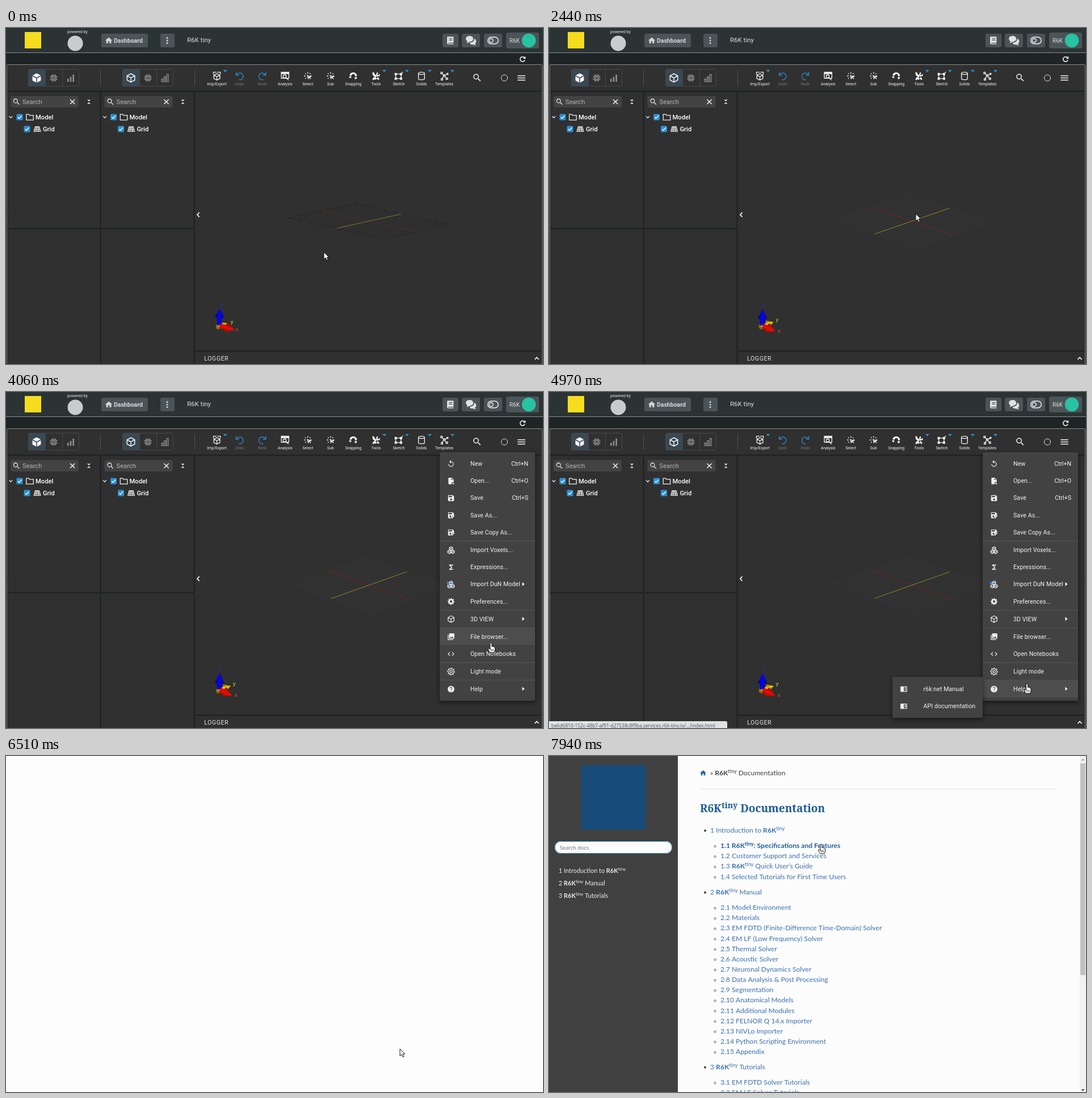
These frames come from a looping animation (946x592 px, 8000 ms). An HTML page with a canvas:

```html
<!DOCTYPE html>
<html lang="en">
<head>
<meta charset="utf-8">
<title>Modelling workspace</title>
<style>
html, body { margin: 0; width: 100%; height: 100%; overflow: hidden; background: #303030; }
canvas { display: block; }
</style>
</head>
<body>
<canvas id="stage" width="946" height="592"></canvas>
<script>
const g = document.getElementById('stage').getContext('2d');
const LOOP = 8000;
const BLUE = '#2b8fd6', WHITE = '#f4f4f4', GREY = '#8c8c8c';

// Icons live in a 24 x 24 box.
const solid = {
  search: 'M15.5 14h-.8l-.3-.3A6.5 6.5 0 1 0 13.7 14.4l.3.3v.8l5 5L20.5 19zM9.5 14a4.5 4.5 0 1 1 0-9 4.5 4.5 0 0 1 0 9z',
  menu: 'M3 18h18v-2H3zM3 13h18v-2H3zM3 6v2h18V6z',
  save: 'M17 3H5a2 2 0 0 0-2 2v14a2 2 0 0 0 2 2h14a2 2 0 0 0 2-2V7zM12 19a3 3 0 1 1 0-6 3 3 0 0 1 0 6zM15 9H5V5h10z',
  edit: 'M17 3H5a2 2 0 0 0-2 2v14a2 2 0 0 0 2 2h6l8-9 2 1V7zM12 18a3 3 0 1 1 0-5zM15 9H5V5h10zM13 22l1-3 7-7 2 2-7 7z',
  back: 'M12 5V1L7 6l5 5V7a6 6 0 1 1-6 6H4a8 8 0 1 0 8-8z',
  file: 'M14 2H6a2 2 0 0 0-2 2v16a2 2 0 0 0 2 2h8v-6h6V8zM13 9V4l5 5zM16 18h3l-1-1 4 3-4 3v-2h-2z',
  code: 'M9.4 16.6L4.8 12l4.6-4.6L8 6l-6 6 6 6zM14.6 16.6l4.6-4.6-4.6-4.6L16 6l6 6-6 6z',
  help: 'M12 2a10 10 0 1 0 .01 0zM13 19h-2v-2h2zM15 11.3c-1.5 1.3-2 2-2 3.7h-2c0-3 3-3.6 3-6a2 2 0 0 0-4 0H8a4 4 0 0 1 8 0c0 1-.4 1.7-1 2.3z',
  photos: 'M22 16V4a2 2 0 0 0-2-2H8a2 2 0 0 0-2 2v12a2 2 0 0 0 2 2h12a2 2 0 0 0 2-2zM11 12l2 2.7 3-3.7 4 5H8zM2 6v14a2 2 0 0 0 2 2h14v-2H4V6z',
  sigma: 'M18 4H6v2l6.5 6L6 18v2h12v-3h-7l5-5-5-5h7z',
  home: 'M10 20v-6h4v6h5v-8h3L12 3 2 12h3v8z',
  box: 'M12 1l9.5 5L12 11 2.5 6zM2 8l9 5v10l-9-5zM22 8l-9 5v10l9-5z',
  bars: 'M3 14h4v8H3zM10 9h4v13h-4zM17 3h4v19h-4z',
  book: 'M5 2h15v16H6v2h14v2H6a3 3 0 0 1-3-3V4a2 2 0 0 1 2-2zM8 6v2h9V6zM8 10v2h9v-2z',
  chat: 'M9 2c11 0 11 13 0 13l-6 3 1-4C-2 9 1 2 9 2zM19 8c6 2 6 9 2 11l2 4-6-2c-4 1-7-1-8-4 7 0 11-4 10-9z',
  page: 'M2 4h20v16H2zM12 6v12h8V6zM14 8h5v1.5h-5zM14 11h5v1.5h-5zM14 14h5v1.5h-5z',
  magnet: 'M2 10C4 0 20 0 22 11l-5 3C17 4 8 5 7 12zM15 17l5-3 2 4-5 3zM2 12l5 2-1 4-5-2z',
  wrench: 'M2 3l4-1 3 6 4 3 8 9-3 3-9-9-5-3zM15 2l3 3-3 3 3 2 4-4v6l-5 1-5 9-4-1 6-9-2-4zM5 16l4-2 2 3-5 6-4-1z'
};
const outline = {
  close: 'M5 5l14 14M19 5L5 19',
  cube: 'M12 2l9 5v10l-9 5-9-5V7zM3 7l9 5 9-5M12 12v10',
  chip: 'M6 6h12v12H6zM9 9h6v6H9zM9 2v4M15 2v4M9 18v4M15 18v4M2 9h4M2 15h4M18 9h4M18 15h4',
  obars: 'M3 15h4v7H3zM10 9h4v13h-4zM17 3h4v19h-4z',
  folder: 'M2 4h7l2 3h11v13H2z',
  grid: 'M6 5h12l4 14H2zM5 9h14M4 14h16M10 5L8 19M14 5l2 14',
  collapse: 'M7 3l5 5 5-5M7 21l5-5 5 5',
  down: 'M5 8l7 7 7-7', left: 'M15 4l-7 8 7 8', up: 'M5 15l7-7 7 7',
  undo: 'M3 2v8h8M4 10a9 9 0 1 1 6 12',
  import: 'M4 10l8-4 8 4v9l-8 4-8-4zM4 10l8 4 8-4M12 14v9M3 8V2h8M21 8V2h-8',
  analysis: 'M2 2h20v16H2zM2 4h20M2 6h20M15 13a4 4 0 1 1-8 0 4 4 0 0 1 8 0zM14 16l7 7',
  select: 'M12 2v4M5 5l2 2M19 5l-2 2M2 12h4M18 12h4M5 19l2-2M11 11l2 8 2-4 4-1zM15 15l5 5',
  sketch: 'M4 7h14v12H4zM2 5h4v4H2zM16 5h4v4h-4zM2 17h4v4H2zM16 17h4v4h-4zM20 4l3-3',
  solids: 'M4 5c0-4 16-4 16 0s-16 4-16 0v14c0 4 16 4 16 0V5',
  nodes: 'M3 2h4v4H3zM10 9h4v4h-4zM19 5h3v3h-3zM4 19h4v4H4zM17 17h4v4h-4zM6 6l5 4M14 11l5-4M11 13l-5 6M13 13l5 5',
  voxels: 'M12 2l5 3v5l-5 3-5-3V5zM7 12l5 3v5l-5 3-5-3v-5zM17 12l5 3v5l-5 3-5-3v-5zM7 5l5 3 5-3M2 15l5 3 10 0 5-3',
  reload: 'M20 9a8.5 8.5 0 1 0 0 6M21 3v6h-6',
  toggle: 'M8 5h8a7 7 0 0 1 0 14H8A7 7 0 0 1 8 5zM12 12a4 4 0 1 1-8 0 4 4 0 0 1 8 0z'
};
let teeth = '';
for (let i = 0; i < 32; i++) {
  const r = i % 4 < 2 ? 10.5 : 7.8, a = i * Math.PI / 16;
  teeth += (i ? 'L' : 'M') + (12 + r * Math.cos(a)) + ' ' + (12 + r * Math.sin(a));
}
solid.gear = outline.gear2 = teeth + 'zM15.5 12a3.5 3.5 0 1 0-7 0 3.5 3.5 0 0 0 7 0z';
const paths = {};
for (const [k, d] of Object.entries({ ...solid, ...outline })) paths[k] = new Path2D(d);

function icon(name, x, y, size, color = WHITE, { flip = 1, weight = 2 } = {}) {
  g.save();
  g.translate(x, y);
  g.scale(size / 24 * flip, size / 24);
  g.translate(-12, -12);
  g.fillStyle = g.strokeStyle = color;
  g.lineWidth = weight;
  if (solid[name]) g.fill(paths[name], 'evenodd'); else g.stroke(paths[name]);
  g.restore();
}
function rect(x, y, w, h, color, r = 0) {
  g.fillStyle = color;
  g.beginPath();
  g.roundRect(x, y, w, h, r);
  g.fill();
}
function frame(x, y, w, h, color, r = 0) {
  g.strokeStyle = color;
  g.lineWidth = 1;
  g.beginPath();
  g.roundRect(x + .5, y + .5, w - 1, h - 1, r);
  g.stroke();
}
function disc(x, y, r, color, ring = 0) {
  g.beginPath();
  g.arc(x, y, r, 0, 7);
  g.fillStyle = g.strokeStyle = color;
  g.lineWidth = ring;
  if (ring) g.stroke(); else g.fill();
}
function line(x1, y1, x2, y2, color, w = 1, dash = []) {
  g.strokeStyle = color;
  g.lineWidth = w;
  g.setLineDash(dash);
  g.beginPath();
  g.moveTo(x1, y1);
  g.lineTo(x2, y2);
  g.stroke();
  g.setLineDash([]);
}
function poly(color, ...p) {
  g.fillStyle = color;
  g.beginPath();
  for (let i = 0; i < p.length; i += 2) g.lineTo(p[i], p[i + 1]);
  g.closePath();
  g.fill();
}
function text(s, x, y, size, color = WHITE, { face = 'Roboto', weight = 400, align = 'left', gap = 0 } = {}) {
  g.font = `${weight} ${size}px "${face}", sans-serif`;
  g.textAlign = align;
  g.letterSpacing = gap + 'px';
  g.fillStyle = color;
  g.fillText(s, x, y);
  return g.measureText(s).width;
}
// *bold* and ^raised^ runs
function rich(s, x, y, size, color, weight = 400, face = 'Lato') {
  for (const part of s.split(/(\*[^*]+\*|\^[^^]+\^)/)) {
    const mark = part[0], up = mark === '^', bold = mark === '*';
    x += text(up || bold ? part.slice(1, -1) : part, x, up ? y - size * .36 : y,
      up ? size * .75 : size, color, { face, weight: bold ? 700 : weight });
  }
}

const clamp = v => Math.max(0, Math.min(1, v));
const ramp = (t, a, b) => clamp((t - a) / (b - a));
const mix = (a, b, k) => a + (b - a) * k;

// time, x, y of the pointer's hot spot
const trail = [
  [0, 560, 395], [55, 560, 395], [130, 574, 385], [800, 574, 385], [1350, 633, 334], [1660, 633, 334],
  [2500, 647, 327], [3200, 932, 104], [3340, 905, 84], [3400, 903, 90], [3460, 902, 108],
  [4180, 845, 508], [4300, 842, 514], [5000, 842, 514], [5570, 700, 518], [5690, 700, 518],
  [5810, 695, 515], [6300, 695, 515], [6370, 694, 516], [6960, 694, 516], [7220, 655, 385],
  [7480, 590, 270], [7820, 481, 153], [7940, 479.5, 155], [LOOP, 479.5, 155]
];
function pointer(t) {
  const i = trail.findIndex(p => p[0] > t), a = trail[i - 1], b = trail[i];
  const k = ramp(t, a[0], b[0]);
  return [mix(a[1], b[1], k), mix(a[2], b[2], k)];
}
const arrow = new Path2D('M0 0V12.5L3 9.8 5 14.3 7.2 13.3 5.2 9H9z');
const hand = new Path2D('M-1.5 1.2Q0-1 1.5 1.2V6.5Q3 5.5 3.8 7 5.2 6.3 5.8 7.7 7 7 7 9V13L5.5 17H-2L-5 11.5Q-5 8.5-3 10.5L-1.5 12z');
function drawPointer(x, y, isHand) {
  const shape = isHand ? hand : arrow;
  g.save();
  g.translate(x, y);
  g.lineJoin = 'round';
  g.fillStyle = '#fff';
  g.strokeStyle = '#111';
  g.lineWidth = 1;
  g.fill(shape);
  g.stroke(shape);
  if (isHand) for (const dx of [0, 2, 4]) line(dx, 11, dx, 14.5, '#222', .8);
  g.restore();
}

function header() {
  rect(0, 0, 946, 43, '#2c3335');
  rect(0, 43, 946, 1, '#8b9092');
  rect(0, 44, 946, 21, '#1f2527');
  rect(33, 7, 29, 29, '#f6dc1c');
  text('powered by', 108, 9, 7, '#e8e8e8');
  disc(122, 27, 13.5, '#c9cccd');
  for (const [x, w] of [[168, 82], [272, 25], [769, 28], [803, 32], [842, 32]]) rect(x, 10, w, 24, '#4b5457', 3);
  icon('home', 181, 22, 15, '#d4d6d7');
  text('Dashboard', 190, 25.5, 10.5, '#d4d6d7', { weight: 700 });
  for (const y of [17.5, 22, 26.5]) disc(284, y, 1.5, '#d4d6d7');
  text('R6K tiny', 319, 25, 11.5, '#dcdedf');
  icon('book', 783, 22, 16, '#dfe1e2');
  icon('chat', 819, 22, 19, '#dfe1e2');
  icon('toggle', 858, 22, 20, '#dfe1e2');
  rect(881, 8, 58, 28, '#4b5457', 4);
  text('R6K', 887, 25.5, 10, '#dcdedf');
  disc(921, 22, 12.3, '#27c3a2');
  icon('reload', 910, 55, 12, WHITE, { weight: 3.2 });
}

const tools = ['Imp/Export import', 'Undo undo', 'Redo undo', 'Analysis analysis', 'Select select', 'Sub select',
  'Snapping magnet', 'Tools wrench', 'Sketch sketch', 'Solids solids', 'Templates nodes'];
function toolbar() {
  rect(0, 65, 946, 527, '#303030');
  rect(0, 65, 2, 527, '#202526');
  line(2, 64.5, 944, 64.5, '#8a8a8a');
  line(1.5, 65, 1.5, 592, '#777');
  line(944.5, 65, 944.5, 592, '#777');
  for (const x of [39, 205]) {
    const second = x > 100;
    rect(x, 73, 30, 30, '#394853', 3);
    frame(x, 72, 90, 31, '#484848', 3);
    line(x + 30.5, 73, x + 30.5, 103, '#484848');
    line(x + 60.5, 73, x + 60.5, 103, '#484848');
    icon(second ? 'cube' : 'box', x + 15, 88, 18);
    icon('chip', x + 45, 88, 16, GREY);
    icon(second ? 'obars' : 'bars', x + 75, 88, 16, GREY);
    line(x + 127.5, 74, x + 127.5, 102, '#525252');
  }
  tools.forEach((tool, i) => {
    const [label, name] = tool.split(' '), x = 371.5 + i * 40.05, dim = name === 'undo';
    icon(name, x, 84.5, 16, dim ? BLUE : WHITE, { flip: label === 'Redo' ? -1 : 1 });
    text(label, x, 101, 6.9, dim ? '#777' : WHITE, { align: 'center' });
    if (i === 0 || i > 6) poly(BLUE, x + 11, 74, x + 18, 74, x + 14.5, 78);
  });
  icon('search', 830, 87.5, 18);
  disc(878, 88, 5.5, '#dedede', 1);
}

function panels() {
  const dark = '#222526';
  rect(2, 110, 942, 3, dark);
  for (const x of [165, 330]) rect(x, 110, 3, 482, dark);
  rect(2, 352, 329, 3, dark);
  rect(332, 568, 612, 3, dark);
  for (const x of [0, 165.5]) {
    rect(x + 8, 120, 120, 20, '#434343', 3);
    icon('search', x + 18.5, 130, 15);
    text('Search', x + 29, 134, 11.2, '#b4b4b4');
    icon('close', x + 117, 130, 14, WHITE, { weight: 2.6 });
    icon('collapse', x + 146, 130, 10, WHITE, { weight: 3.5 });
    icon('down', x + 8.5, 157, 10, WHITE, { weight: 3 });
    icon('folder', x + 42, 157, 15);
    text('Model', x + 52, 160.5, 11.2, '#fff', { weight: 500 });
    icon('grid', x + 55, 178, 14);
    text('Grid', x + 65, 181.5, 11.2, '#fff', { weight: 500 });
    for (const [cx, cy] of [[24, 157], [37, 178]]) {
      rect(x + cx - 5.5, cy - 5.5, 11, 11, BLUE, 1.5);
      g.strokeStyle = '#fff';
      g.lineWidth = 1.4;
      g.stroke(new Path2D(`M${x + cx - 3} ${cy}l2 2.5 4.5-5`));
    }
  }
  icon('left', 339, 329, 12, '#fff', { weight: 3.4 });
  text('LOGGER', 349, 586, 10.6, '#e2e2e2', { gap: .6 });
  icon('up', 935, 582.5, 12, '#fff', { weight: 3.4 });
}

function floorGrid(k) {
  const cx = 639.5, cy = 340.3;
  const ux = mix(81, 72, k), uy = mix(18, 25.5, k), vx = mix(56.5, 66.5, k), vy = mix(-12.5, -23.5, k);
  const seg = (a, b, c, d, ...style) =>
    line(cx + a * ux + b * vx, cy + a * uy + b * vy, cx + c * ux + d * vx, cy + c * uy + d * vy, ...style);
  const shade = k > .5 ? `rgba(105,105,105,${.5 * k})` : 'rgba(20,20,20,.35)';
  for (let i = -10; i <= 10; i++) {
    const q = i / 9.7;
    seg(q, -1.03, q, 1.03, shade, .7, [1, 3]);
    seg(-1.03, q, 1.03, q, shade, .7, [1, 4]);
  }
  const edge = `rgba(16,16,16,${.7 * (1 - k)})`;
  for (const s of [-1.03, 1.03]) {
    seg(s, -1.03, s, 1.03, edge, .9, [4, 5, 1, 7]);
    seg(-1.03, s, 1.03, s, edge, .9, [5, 6, 1, 6]);
  }
  seg(-1, 0, 1, 0, k > .5 ? '#752525' : '#5c2a2a', 1, k > .5 ? [] : [5, 1]);
  seg(0, -1, 0, 1, k > .5 ? '#918a2c' : '#857626', 1);
  line(638.5, 340, 638.5, mix(331, 333, k), '#2c2c8c');
}

function cone(x0, y0, x1, y1, x2, y2, w, hue) {
  const d = Math.hypot(x2 - x1, y2 - y1), nx = (y1 - y2) / d * w, ny = (x2 - x1) / d * w;
  const fill = g.createLinearGradient(x1 - nx, y1 - ny, x1 + nx, y1 + ny);
  fill.addColorStop(0, `hsl(${hue},95%,27%)`);
  fill.addColorStop(.5, `hsl(${hue},95%,47%)`);
  fill.addColorStop(1, `hsl(${hue},95%,30%)`);
  line(x0, y0, x1, y1, fill, w * 1.05);
  poly(fill, x1 - nx, y1 - ny, x2, y2, x1 + nx, y1 + ny);
  g.beginPath();
  g.ellipse(x1, y1, w * .3, w, Math.atan2(y2 - y1, x2 - x1), 0, 7);
  g.fill();
}
function gizmo(k) {
  disc(374.5, 526, 5, '#8a7400');
  cone(374, 526, mix(381, 385, k), mix(523, 521.5, k), mix(391, 396, k), mix(520, 518, k), mix(4.5, 6.5, k), 50);
  cone(376, 524, 376, mix(509, 512, k), 376.5, mix(494, 495, k), 8, 240);
  cone(376, 525.5, mix(388, 385, k), mix(527.5, 528.5, k), mix(403, 398, k), mix(532, 534.5, k), mix(8, 8.5, k), 2);
  const label = { align: 'center', face: 'Liberation Sans' };
  text('z', mix(380, 378, k), mix(489, 491, k), 9, '#3030d8', label);
  text('y', mix(398, 402, k), mix(521, 517, k), 9, '#dede32', label);
  text('x', mix(407, 405, k), mix(534, 537, k), 9, '#e05a28', label);
}

const menu = ['New|back|Ctrl+N', 'Open...|file|Ctrl+O', 'Save|save|Ctrl+S', 'Save As...|edit', 'Save Copy As...|edit',
  '-Import Voxels...|voxels', 'Expressions...|sigma', 'Import DuN Model|voxels|>', 'Preferences...|gear',
  '-3D VIEW|cube|>', '-File browser...|photos', 'Open Notebooks|code', '-Light mode|gear2', '-Help|help|>'];
function sheet(x, y, w, h) {
  g.shadowColor = 'rgba(0,0,0,.55)';
  g.shadowBlur = 10;
  g.shadowOffsetY = 3;
  rect(x, y, w, h, '#424242', 3);
  g.shadowColor = 'transparent';
}
function mainMenu(t, px, py) {
  const p = ramp(t, 3340, 3590), s = 1 - .25 * (1 - p) ** 3.45;
  g.save();
  g.globalAlpha = 1 - (1 - p) ** 2;
  g.translate(888, 106);
  g.scale(s, s * s);
  g.translate(-888, -106);
  sheet(764, 106, 168, 438);
  let y = 126;
  menu.forEach((row, i) => {
    const [label, name, end] = row.replace('-', '').split('|');
    if (row[0] === '-') {
      y += .8;
      line(764, y - 15.2, 932, y - 15.2, '#575757');
    }
    if (t > 3500 && px > 764 && Math.abs(py + 2 - y) < 15.1) rect(764, y - 15, 168, 30, '#4d4d4d');
    icon(name, 784, y + .5, 14, '#f0f0f0');
    if (i === 7) poly(BLUE, 777, y - 5, 781, y - 3, 781, y + 2, 777, y);
    text(label, 818, y + 4, 10.6, WHITE, { gap: .08 });
    if (end === '>') poly(WHITE, 909.5, y - 3.5, 913.5, y, 909.5, y + 3.5);
    else if (end) text(end, 920, y + 4, 10.6, WHITE, { align: 'right' });
    y += 30.23;
  });
  g.restore();
}
function helpMenu(t, px, py) {
  g.save();
  g.globalAlpha = ramp(t, 4730, 4920);
  sheet(605, 502, 159, 72);
  if (px < 764 && py > 508 && py < 538) rect(605, 508, 159, 30, '#505050');
  if (t >= 6190) disc(694, 521, mix(4, 14, ramp(t, 6190, 6370)), '#646464');
  ['r6k:net Manual', 'API documentation'].forEach((label, i) => {
    const y = 523 + i * 30.2;
    icon('page', 625, y + .5, 14);
    text(label, 659.5, y + 4, 10.6, WHITE, { gap: .08 });
  });
  g.restore();
}
function statusBar() {
  rect(0, 580, 314, 12, '#dfe1e4', [0, 3, 0, 0]);
  text('be6d6810-152c-48b7-af91-d27538c8f9ba.services.r6k-tiny.io/.../index.html', 4, 590.5, 8.4, '#4c4f54', { face: 'Open Sans' });
}

function workspace(t, px, py) {
  const k = ramp(t, 1660, 2500);
  header();
  toolbar();
  panels();
  floorGrid(k);
  gizmo(k);
  if (t > 3270 && t < 3560) disc(908, 88, 15, '#585858');
  icon('menu', 908, 88, 18);
  if (t >= 3400) mainMenu(t, px, py);
  if (t >= 4790) helpMenu(t, px, py);
  if (t >= 4790 && t < 6310) statusBar();
}

const chapters = [
  [131, '1 Introduction to *R6K*^tiny^', ['*R6K*^tiny^: Specifications and Features', 'Customer Support and Services',
    '*R6K*^tiny^ Quick User’s Guide', 'Selected Tutorials for First Time Users']],
  [240, '2 *R6K*^tiny^ Manual', ['Model Environment', 'Materials', 'EM FDTD (Finite-Difference Time-Domain) Solver',
    'EM LF (Low Frequency) Solver', 'Thermal Solver', 'Acoustic Solver', 'Neuronal Dynamics Solver',
    'Data Analysis & Post Processing', 'Segmentation', 'Anatomical Models', 'Additional Modules',
    'FELNOR Q 14.x Importer', 'NIVLo Importer', 'Python Scripting Environment', 'Appendix']],
  [548, '3 *R6K*^tiny^ Tutorials', ['EM FDTD Solver Tutorials', 'EM LF Solver Tutorials']]
];
function docs(t) {
  const link = '#3a70b4', ink = '#404040';
  rect(0, 0, 946, 592, '#fcfcfc');
  rect(0, 0, 227, 592, '#404040');
  rect(57, 16, 113, 114, '#174a78', 2);
  rect(10, 150, 207, 22, '#fcfcfc', 11);
  frame(10, 150, 207, 22, '#3585ba', 10.5);
  text('Search docs', 19, 164.5, 9.8, '#777', { face: 'Lato' });
  icon('home', 271.5, 30, 13, '#28629f');
  rich('» *R6K*^tiny^ Documentation', 284, 34, 12.1, ink);
  rect(266, 58, 628, 1, '#e1e4e5');
  rich('R6K^tiny^ Documentation', 266, 99, 19, '#1c5b99', 700, 'Noto Serif');
  chapters.forEach(([y, title, items], c) => {
    rich(title, 17, 206 + c * 22.2, 10.9, '#ececec');
    disc(275, y + .5, 2, ink);
    rich(title, 284, y + 4, 12.1, link);
    items.forEach((item, i) => {
      const iy = y + 27.2 + i * 18.13, hot = c + i === 0 && t >= 7820;
      disc(292.5, iy + 1, 1.7, ink, .8);
      rich(`${c + 1}.${i + 1} ${item}`, 302, iy + 4, 12.1, hot ? '#1f5d9c' : link, hot ? 700 : 400);
    });
  });
  rect(935, 0, 11, 592, '#f1f1f1');
  rect(936, 13, 9, 373, '#c1c1c1');
  poly('#a0a0a0', 937.5, 8, 943.5, 8, 940.5, 4.5);
  poly('#505050', 937.5, 587, 943.5, 587, 940.5, 590.5);
}

function draw() {
  const t = performance.now() % LOOP, [x, y] = pointer(t);
  if (t < 6510) workspace(t, x, y);
  else if (t < 6710) rect(0, 0, 946, 592, '#fdfdfd');
  else docs(t);
  const isHand = (t > 3270 && t < 3430) || (t > 3500 && t < 6310) || t >= 7820;
  drawPointer(x, y, isHand);
  requestAnimationFrame(draw);
}
draw();
</script>
</body>
</html>
```
